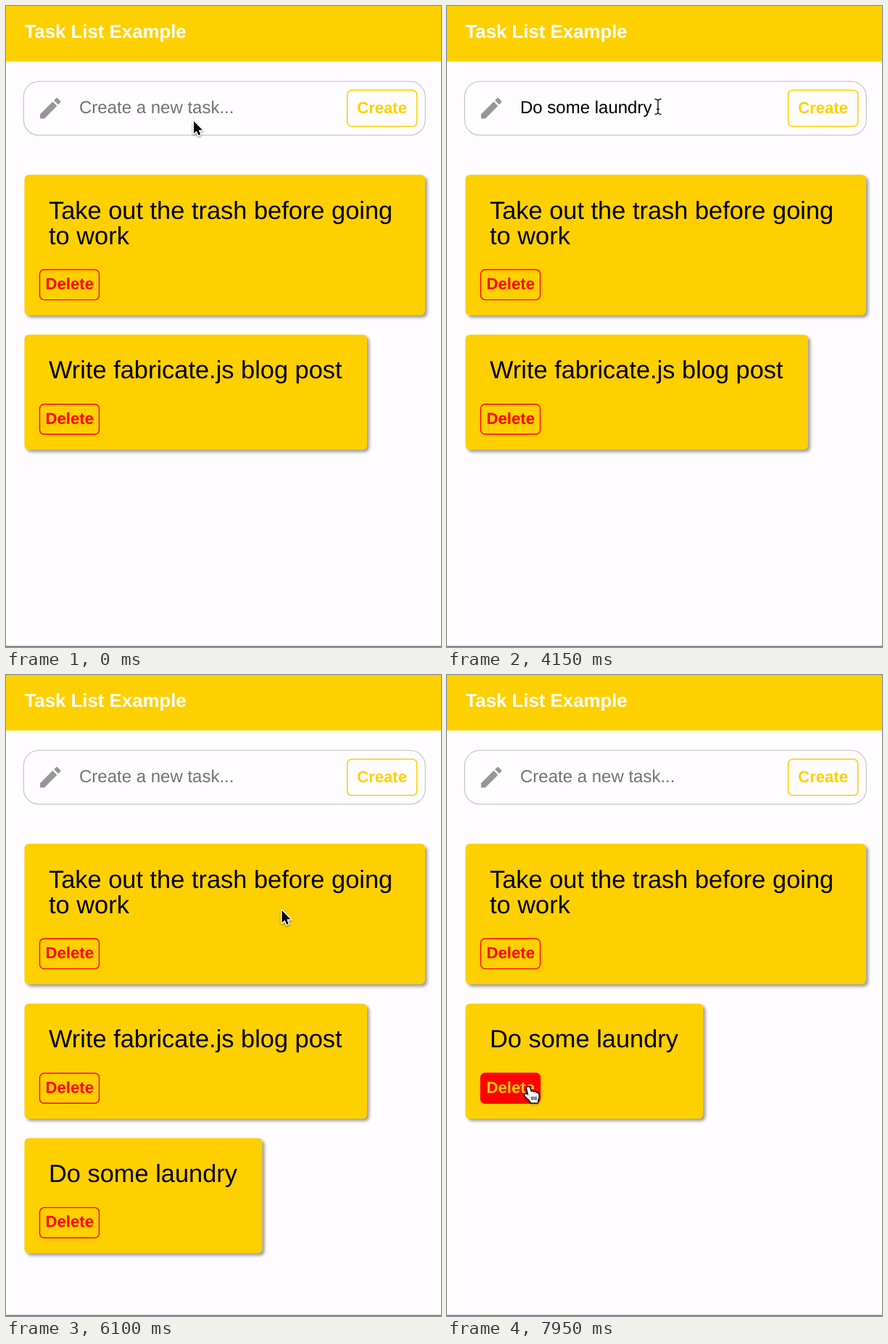
An HTML page with a canvas for the animation above (8 s loop, 600 by 885 pixels).

```html
<!DOCTYPE html>
<html lang="en">
<head>
<meta charset="utf-8">
<title>Task List Example</title>
<style>
  html, body { margin: 0; height: 100%; overflow: hidden; background: #fefcff; }
  canvas { display: block; }
</style>
</head>
<body>
<canvas id="stage" width="600" height="885"></canvas>
<script>
const ctx = document.getElementById('stage').getContext('2d');
const LOOP = 8000;
const YELLOW = '#fed000', PAPER = '#fefcff', RED = '#ff0000';

const TYPED = 'Do some laundry';
const FOCUS = 700, TYPE_START = 1230, KEY_GAP = 106, BLINK = 470;
const LAST_KEY = TYPE_START + (TYPED.length - 1) * KEY_GAP;
const MOUSE_BACK = 3900, CREATED = 5000, DELETED = 7500;

const CREATE_BOX = { x: 470.7, y: 116.2, w: 96, h: 50 };
const FIELD_BOX = { x: 96, y: 124, w: 368, h: 33 };

const TASKS = [
  { lines: ['Take out the trash before going', 'to work'], width: 552.5, until: LOOP, from: 0 },
  { lines: ['Write fabricate.js blog post'], width: 472.5, until: DELETED, from: 0 },
  { lines: [TYPED], width: 328, until: LOOP, from: CREATED },
];

// Pointer stops: time, x, y
const MOUSE_PATH = [
  [0, 259, 159], [400, 253, 140], [3900, 253, 140], [4150, 291, 139],
  [4750, 525, 140], [5700, 525, 140], [6600, 180, 582], [6900, 172, 577],
  [7250, 112, 569], [8000, 112, 569],
];

const PENCIL = new Path2D('M3 17.25V21h3.75L17.81 9.94l-3.75-3.75zM20.71 7.04a1 1 0 0 0 0-1.41l-2.34-2.34a1 1 0 0 0-1.41 0l-1.83 1.83 3.75 3.75z');
const ARROW = new Path2D('M0 0V17L3.9 13.4 6.5 19.4 9.2 18.2 6.7 12.3H12Z');
const BEAM = new Path2D('M-4.5 -10.5Q0 -10.5 0 -7.5Q0 -10.5 4.5 -10.5M0 -8V8M-4.5 10.5Q0 10.5 0 7.5Q0 10.5 4.5 10.5M-2 3.5H2');
const HAND = new Path2D('M-1.8 2C-2.3 -.5 1.2 -1.2 2 1L4 7C5 5.5 7 6 7.5 7.5C8.5 6.3 10.5 6.8 11 8.3C12.5 7.5 14 8.5 14.3 10.5C15 14 14 16 13 18V21.5H4C3.5 19 -1 15.5 -4 12.5C-6 10 -3.5 8.5 -1.5 10L.5 11.5Z');
const HAND_LINES = new Path2D('M5.3 13v5M8 13v5M10.7 13v5');

function text(str, x, y, size, color, weight = 'normal') {
  ctx.font = `${weight} ${size}px "Liberation Sans", Arial, sans-serif`;
  ctx.fillStyle = color;
  ctx.fillText(str, x, y);
  return ctx.measureText(str).width;
}

function box({ x, y, w, h }, radius, fill, stroke, lineWidth = 1.6) {
  ctx.beginPath();
  ctx.roundRect(x, y, w, h, radius);
  if (fill) { ctx.fillStyle = fill; ctx.fill(); }
  if (stroke) { ctx.strokeStyle = stroke; ctx.lineWidth = lineWidth; ctx.stroke(); }
}

function stroke(path, color, width) {
  ctx.strokeStyle = color;
  ctx.lineWidth = width;
  ctx.stroke(path);
}

function withShadow(offsetX, offsetY, blur, color, draw) {
  ctx.save();
  Object.assign(ctx, { shadowOffsetX: offsetX, shadowOffsetY: offsetY, shadowBlur: blur, shadowColor: color });
  draw();
  ctx.restore();
}

const inside = (p, b) => p.x >= b.x && p.x <= b.x + b.w && p.y >= b.y && p.y <= b.y + b.h;

function mouseAt(t) {
  const i = MOUSE_PATH.findIndex(stop => stop[0] > t);
  const [t0, x0, y0] = MOUSE_PATH[i - 1], [t1, x1, y1] = MOUSE_PATH[i];
  const k = (t - t0) / (t1 - t0), eased = k * k * (3 - 2 * k);
  return { x: x0 + (x1 - x0) * eased, y: y0 + (y1 - y0) * eased };
}

function drawInput(t, hoverCreate) {
  box({ x: 24.3, y: 104.2, w: 554, h: 74.2 }, 21, PAPER, '#c9c8ca', 1.3);

  ctx.save();
  ctx.translate(42.2, 122.2);
  ctx.scale(1.58, 1.58);
  ctx.fillStyle = '#979598';
  ctx.fill(PENCIL);
  ctx.restore();

  const count = t < CREATED ? Math.max(0, Math.floor((t - TYPE_START) / KEY_GAP) + 1) : 0;
  const value = TYPED.slice(0, count);
  let width = 0;
  if (value) width = text(value, 101, 148, 24, '#000');
  else text('Create a new task...', 101, 148, 24, '#747275');

  const lastChange = t < TYPE_START ? FOCUS : Math.min(t, LAST_KEY);
  const caretOn = Math.floor((t - lastChange) / BLINK) % 2 === 0;
  if (t >= FOCUS && t < CREATED && caretOn) {
    ctx.fillStyle = '#000';
    ctx.fillRect(101 + width, 128, 1.6, 26);
  }

  box(CREATE_BOX, 6, hoverCreate ? YELLOW : PAPER, YELLOW);
  text('Create', 484.2, 148, 22.1, hoverCreate ? '#fff' : YELLOW, 'bold');
}

// Draws one card and reports its height and whether its button is hovered
function drawCard(task, y, mouse) {
  const h = 159 + (task.lines.length - 1) * 35;
  withShadow(3, 3, 4, '#0006', () => box({ x: 25.5, y, w: task.width, h }, 6, YELLOW));
  task.lines.forEach((line, i) => text(line, 59, y + 60.5 + i * 35, 34.4, '#000'));
  const button = { x: 46.5, y: y + h - 63, w: 82, h: 41.6 };
  const hover = inside(mouse, button);
  box(button, 6, hover ? RED : null, RED, 1.4);
  text('Delete', 54.6, y + h - 36, 22.1, hover ? YELLOW : RED, 'bold');
  return { h, hover };
}

function drawMouse({ x, y }, kind) {
  ctx.save();
  ctx.translate(x, y);
  ctx.lineJoin = 'round';
  if (kind === 'beam') {
    stroke(BEAM, '#fff', 3);
    stroke(BEAM, '#111', 1.4);
  } else if (kind === 'hand') {
    withShadow(0, 1.5, 3, '#0005', () => stroke(HAND, '#000', 2.6));
    ctx.fillStyle = '#fff';
    ctx.fill(HAND);
    stroke(HAND_LINES, '#000', 1.2);
  } else {
    withShadow(0, 1.5, 3, '#0006', () => stroke(ARROW, '#fff', 3));
    ctx.fillStyle = '#000';
    ctx.fill(ARROW);
  }
  ctx.restore();
}

function draw(t) {
  ctx.fillStyle = PAPER;
  ctx.fillRect(0, 0, 600, 885);
  ctx.fillStyle = YELLOW;
  ctx.fillRect(0, 0, 600, 76.6);
  ctx.fillStyle = '#747275';
  ctx.fillRect(0, 883.6, 600, 1.4);
  text('Task List Example', 25.5, 43.7, 25.8, '#fff', 'bold');

  const mouse = mouseAt(t);
  const hoverCreate = inside(mouse, CREATE_BOX);
  let overButton = hoverCreate;
  drawInput(t, hoverCreate);

  let y = 233;
  for (const task of TASKS) {
    if (t < task.from || t >= task.until) continue;
    const { h, hover } = drawCard(task, y, mouse);
    overButton ||= hover;
    y += h + 26.7;
  }

  if (t < TYPE_START || t >= MOUSE_BACK) {
    drawMouse(mouse, overButton ? 'hand' : inside(mouse, FIELD_BOX) ? 'beam' : 'arrow');
  }
}

ctx.textRendering = 'geometricPrecision';
const start = performance.now();
function tick() {
  draw((performance.now() - start) % LOOP);
  requestAnimationFrame(tick);
}
tick();
</script>
</body>
</html>
```
